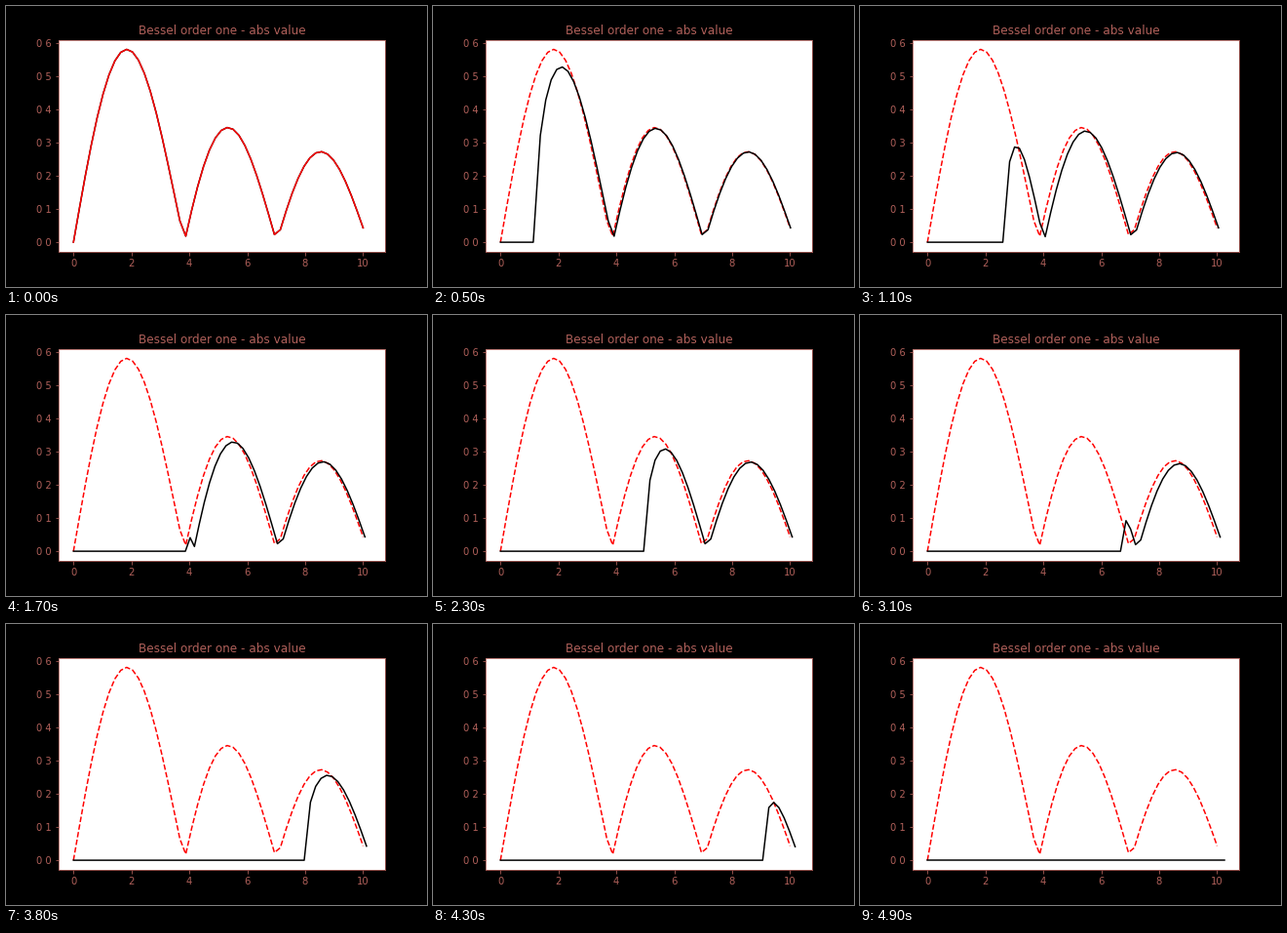
A matplotlib script that plays this animation: 432x288 px, repeating every 5000 ms.

```python
import numpy as np
import matplotlib.pyplot as plt
from matplotlib.animation import FuncAnimation
from matplotlib.ticker import FuncFormatter

N = 50
INK = "#b0605a"

plt.rcParams.update({
    "font.family": "DejaVu Sans",
    "font.size": 10,
    "axes.titlesize": 12,
    "axes.edgecolor": INK,
    "axes.titlecolor": INK,
    "xtick.color": INK,
    "ytick.color": INK,
})


def bessel_j1(x):
    """Integral form of J1, evaluated with the midpoint rule."""
    tau = (np.arange(400) + 0.5) * np.pi / 400
    return np.cos(tau - np.outer(x, np.sin(tau))).mean(axis=1)


def unzip(z):
    """Flatten the curve point by point with vertical-slit maps."""
    z = z.copy()
    states = []
    for k in range(len(z)):
        foot, height = z[k].real, z[k].imag
        z[k] = foot
        z[k + 1:] = foot + np.sqrt((z[k + 1:] - foot) ** 2 + height ** 2)
        states.append(z.copy())
    return states


x = np.linspace(0, 10, N)
y = np.abs(bessel_j1(x))
states = unzip(x + 1j * y)

fig = plt.figure(figsize=(6, 4), dpi=72, facecolor="black")
fig.subplots_adjust(left=0.125, right=0.9, bottom=0.125, top=0.88)
ax = fig.add_subplot()
ax.set_title("Bessel order one - abs value")

bessel_line, = ax.plot(x, y, "r--", lw=1.5)
mapped_line, = ax.plot(x, y, "k", lw=1.5)

x_max = max(s.real.max() for s in states)
ax.set_xlim(-0.05 * x_max, 1.05 * x_max)
ax.set_ylim(-0.05 * y.max(), 1.05 * y.max())
ax.set_xticks(range(0, 11, 2))
ax.set_yticks(np.arange(7) / 10)
ax.yaxis.set_major_formatter(FuncFormatter(lambda v, _: f"{v:.1f}".replace(".", " ")))


def update(step):
    z = states[step]
    mapped_line.set_data(z.real, z.imag)
    # Before any flattening the red line is solid and in front.
    bessel_line.set_linestyle("-" if step == 0 else "--")
    bessel_line.set_zorder(3 if step == 0 else 1)
    return bessel_line, mapped_line


anim = FuncAnimation(fig, update, frames=N, interval=100, repeat=True, repeat_delay=0)
plt.show()
```
